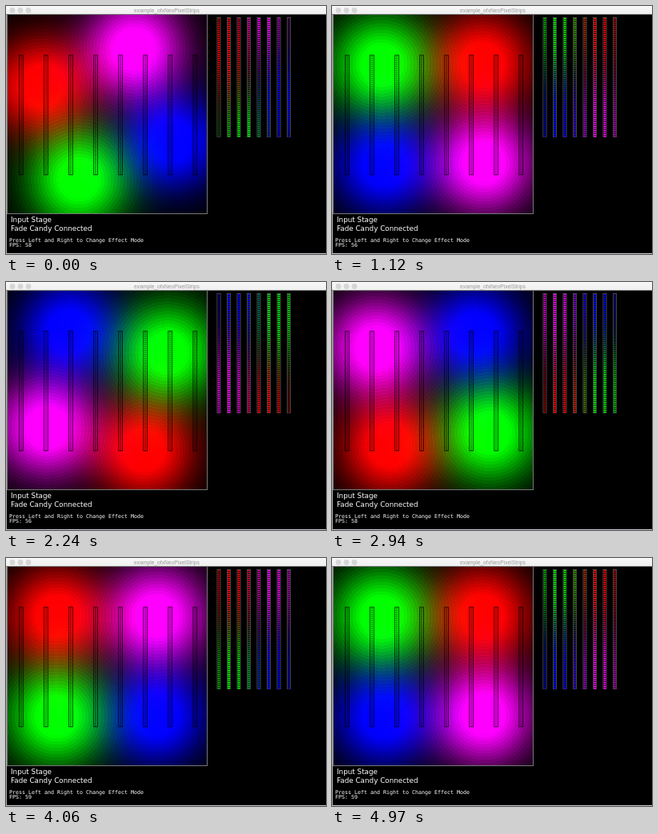
An HTML page with a canvas that plays this animation: 400x311 px, repeating every 5.04 s.

```html
<!DOCTYPE html>
<html>
<head>
<meta charset="utf-8">
<style>
  html, body { margin: 0; height: 100%; overflow: hidden; background: #000; }
  canvas { display: block; }
</style>
</head>
<body>
<canvas id="view" width="400" height="311"></canvas>
<script>
const ctx = document.getElementById('view').getContext('2d');
const LOOP = 5040, STEP = 70;
const STAGE = { x: 1, y: 11, size: 250 };
const CENTER = { x: 126, y: 135.5 }, ORBIT = 89, REACH = 140, BAND = 4;
const STRIPS = 8, LEDS = 60, PITCH = 2.5;
const COLORS = [[255, 0, 255], [0, 0, 255], [0, 255, 0], [255, 0, 0]];

// [time, angle of the first light in degrees]
const TURN = [[0, -67], [1120, 44], [2240, 148], [2940, 217], [3500, 271], [4060, 315], [4970, 404]];
// [time, displayed frame rate]
const RATES = [[0, 58], [350, 57], [840, 56], [1890, 57], [2170, 56], [2590, 57], [2870, 58],
               [3220, 59], [4270, 60], [4690, 59]];

const level = d => Math.min(1, 1.15 * Math.exp(-Math.pow(d / 60, 2.2)));
const rgb = c => `rgb(${c.map(Math.round).join()})`;

function angleAt(t) {
  let i = 1;
  while (i < TURN.length - 1 && t > TURN[i][0]) i++;
  const [t0, a0] = TURN[i - 1], [t1, a1] = TURN[i];
  return (a0 + (a1 - a0) * (t - t0) / (t1 - t0)) * Math.PI / 180;
}

function lightsAt(t) {
  return COLORS.map((color, i) => {
    const a = angleAt(t) + i * Math.PI / 2;
    return { color, x: CENTER.x + ORBIT * Math.cos(a), y: CENTER.y + ORBIT * Math.sin(a) };
  });
}

function sample(lights, x, y) {
  const sum = [0, 0, 0];
  for (const l of lights) {
    const k = level(Math.hypot(x - l.x, y - l.y));
    l.color.forEach((v, i) => sum[i] = Math.min(255, sum[i] + v * k));
  }
  return sum;
}

function rect(color, x, y, w, h) {
  ctx.fillStyle = color;
  ctx.fillRect(x, y, w, h);
}

function text(str, x, y, font, color = '#fff', align = 'left') {
  ctx.font = font;
  ctx.fillStyle = color;
  ctx.textAlign = align;
  ctx.fillText(str, x, y);
}

function outline(color, x, y, w, h, width) {
  ctx.strokeStyle = color;
  ctx.lineWidth = width;
  ctx.strokeRect(x, y, w, h);
}

function drawLight({ color, x, y }) {
  const g = ctx.createRadialGradient(x, y, 0, x, y, REACH);
  for (let d = 0; d < REACH; d += BAND) {
    const c = rgb(color.map(v => v * level(d + BAND / 2)));
    g.addColorStop(d / REACH, c);
    g.addColorStop((d + BAND) / REACH, c);
  }
  g.addColorStop(1, '#000');
  ctx.fillStyle = g;
  ctx.fillRect(STAGE.x, STAGE.y, STAGE.size, STAGE.size);
}

function drawStage(lights) {
  ctx.globalCompositeOperation = 'lighter';
  lights.forEach(drawLight);
  ctx.globalCompositeOperation = 'source-over';
  outline('#777', STAGE.x + .5, STAGE.y - .5, STAGE.size, STAGE.size, 1);
}

function drawStrips(lights) {
  for (let s = 0; s < STRIPS; s++) {
    const x = 18.9 + s * 31.05, outX = 266 + s * 12.5;
    outline('rgba(0,0,0,.75)', x - 2.4, 61.7, 4.8, 150, .9);
    outline('#555', outX - 2.1, 14.5, 4.2, 149.5, .8);
    for (let i = 0; i < LEDS; i++) {
      const y = 62 + i * PITCH;
      rect(rgb(sample(lights, x, y + 1)), outX - 1.5, 15 + i * PITCH, 3, 1.7);
      rect('rgba(0,0,0,.45)', x - 1, y + .4, 2, 1.5);
    }
  }
}

function drawWindow(rate) {
  rect('#000', 0, 0, 400, 311);
  const bar = ctx.createLinearGradient(0, 0, 0, 11);
  bar.addColorStop(0, '#f8f8f8');
  bar.addColorStop(1, '#eee');
  rect(bar, 0, 0, 400, 10.5);
  rect('#aaa', 0, 11, 1, 300);
  rect('#c8c4d0', 0, 310, 400, 1);
  for (const x of [8, 18, 28]) {
    ctx.beginPath();
    ctx.arc(x, 5.5, 3.4, 0, 7);
    ctx.fillStyle = '#d6d6d6';
    ctx.fill();
  }
  text('example_ofxNeoPixelStrips', 201, 8, '6.7px "Liberation Sans", sans-serif', '#999', 'center');
  const label = '8.8px "DejaVu Sans", sans-serif', mono = '6.65px "DejaVu Sans Mono", monospace';
  text('Input Stage', 6, 271, label);
  text('Fade Candy Connected', 6, 281.5, label);
  text('Press Left and Right to Change Effect Mode', 4, 295.5, mono);
  text('FPS: ' + rate, 4, 302, mono);
}

function frame() {
  const t = Math.floor(performance.now() % LOOP / STEP) * STEP;
  const lights = lightsAt(t);
  drawWindow(RATES.filter(r => r[0] <= t).pop()[1]);
  drawStage(lights);
  drawStrips(lights);
  requestAnimationFrame(frame);
}
frame();
</script>
</body>
</html>
```
